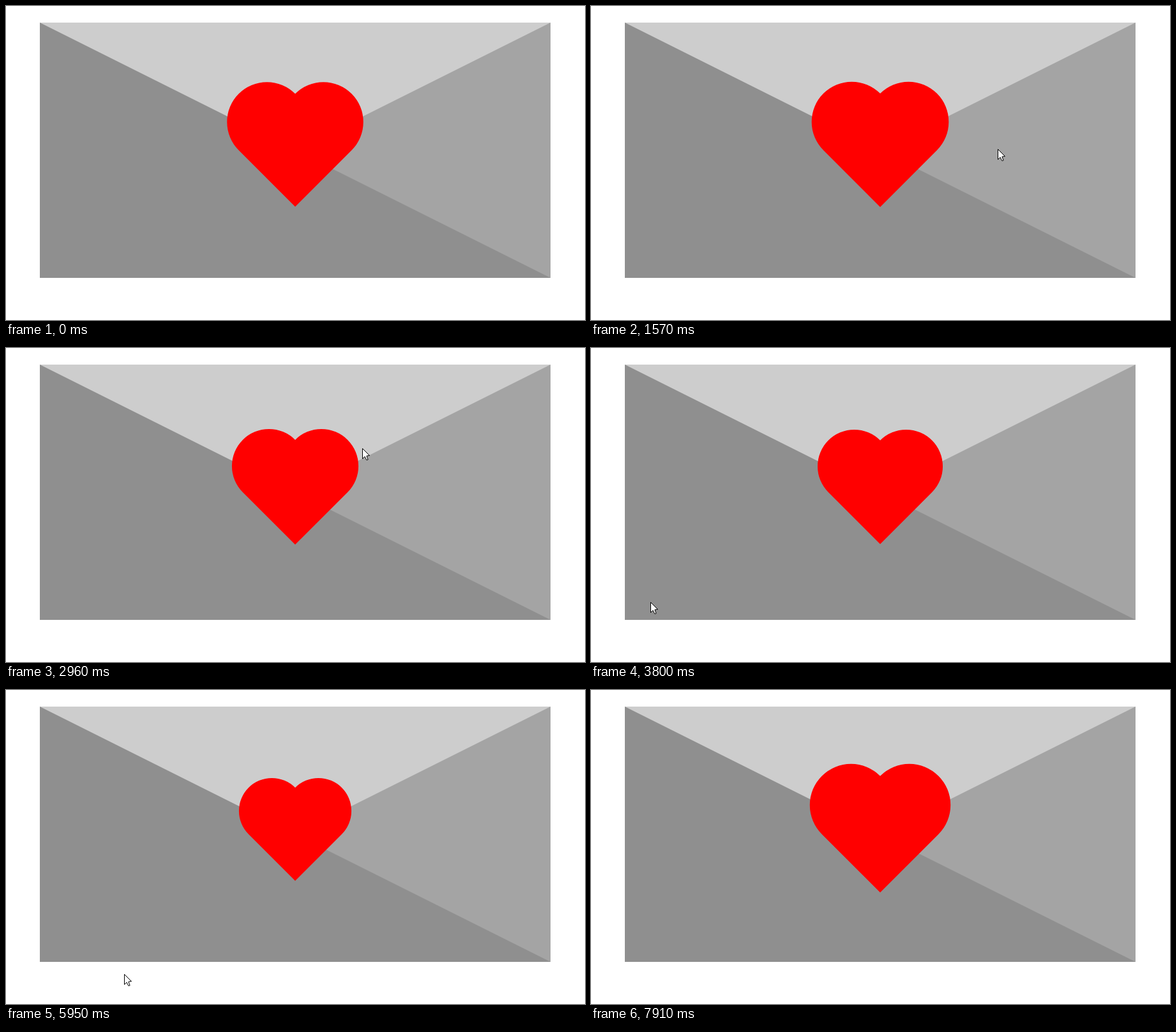
Animation of 907x492 px, one loop 7.98 s. Source, as an HTML page with a canvas:

```html
<!DOCTYPE html>
<html lang="en">
<head>
<meta charset="utf-8">
<title>Beating heart envelope</title>
<style>
  html, body { margin: 0; width: 100%; height: 100%; overflow: hidden; background: #fff; }
  canvas { display: block; }
</style>
</head>
<body>
<canvas id="stage" width="907" height="492"></canvas>
<script>
const ctx = document.getElementById('stage').getContext('2d');
const LOOP = 7980;
const CENTER = { x: 453, y: 226 };
const BEAT = { peak: 270, period: 1552, min: 70, max: 130 };

// Two strokes of the pointer: in and around the heart, then out. It rests between them.
const key = (t, x, y) => ({ t, x, y });
const STROKES = [
  [key(950, 868, 530), key(1270, 790, 300), key(1570, 638, 224), key(1980, 424, 42),
   key(2240, 285, 160), key(2450, 360, 285), key(2820, 565, 203), key(2960, 559, 157),
   key(3220, 350, 95), key(3800, 93, 398), key(4080, 70, 448)],
  [key(5670, 70, 448), key(6300, 440, 446), key(6920, 801, 484), key(7100, 890, 520)]
];

const mix = (a, b, k) => a + (b - a) * k;

const bezier = (a, b, s) =>
  3 * a * s * (1 - s) ** 2 + 3 * b * s * s * (1 - s) + s ** 3;

// Same curve as the CSS "ease" keyword.
function ease(x) {
  let low = 0, high = 1;
  for (let i = 0; i < 24; i++) {
    const mid = (low + high) / 2;
    if (bezier(0.25, 0.25, mid) < x) low = mid; else high = mid;
  }
  return bezier(0.1, 1, low);
}

// Grows and shrinks along the same curve, like an alternating CSS animation.
function heartSide(t) {
  const phase = (t - BEAT.peak + BEAT.period) / BEAT.period % 1;
  return mix(BEAT.min, BEAT.max, ease(Math.abs(1 - 2 * phase)));
}

// Smooth curve through the keys, standing still at both ends.
function along(keys, t, axis) {
  const last = keys.length - 1;
  if (t >= keys[last].t) return keys[last][axis];
  const i = keys.findIndex(k => k.t > t) - 1;
  const slope = n => n === 0 || n === last ? 0
    : (keys[n + 1][axis] - keys[n - 1][axis]) / (keys[n + 1].t - keys[n - 1].t);
  const a = keys[i], b = keys[i + 1], span = b.t - a.t, u = (t - a.t) / span;
  return mix(a[axis], b[axis], u * u * (3 - 2 * u))
    + span * u * (1 - u) * (slope(i) * (1 - u) - slope(i + 1) * u);
}

function trace(points) {
  ctx.beginPath();
  points.forEach(([x, y]) => ctx.lineTo(x, y));
  ctx.closePath();
}

function polygon(color, ...points) {
  trace(points);
  ctx.fillStyle = color;
  ctx.fill();
}

function drawEnvelope() {
  const left = 53, top = 26, right = 853, bottom = 426;
  ctx.fillStyle = '#cdcdcd';
  ctx.fillRect(left, top, right - left, bottom - top);
  polygon('#a4a4a4', [right, top], [right, bottom], [left, bottom]);
  polygon('#8f8f8f', [left, top], [right, bottom], [left, bottom]);
}

function drawHeart(side) {
  const half = side / 2;
  ctx.save();
  ctx.translate(CENTER.x, CENTER.y);
  ctx.rotate(-Math.PI / 4);
  ctx.fillStyle = '#f00';
  ctx.beginPath();
  ctx.rect(-half, -half, side, side);
  ctx.moveTo(half, -half);
  ctx.arc(0, -half, half, 0, Math.PI * 2);
  ctx.moveTo(side, 0);
  ctx.arc(half, 0, half, 0, Math.PI * 2);
  ctx.fill();
  ctx.restore();
}

function drawPointer(t) {
  const stroke = STROKES.filter(keys => keys[0].t <= t).pop();
  if (!stroke) return;
  const [x, y] = ['x', 'y'].map(axis => Math.round(along(stroke, t, axis)));
  ctx.save();
  ctx.translate(x + 0.5, y + 0.5);
  trace([[0, 0], [0, 16], [3.6, 12.6], [6.3, 18], [8.6, 17.4], [6.4, 11.6], [11, 11]]);
  ctx.fillStyle = '#fff';
  ctx.fill();
  ctx.strokeStyle = '#000';
  ctx.lineWidth = 1;
  ctx.stroke();
  ctx.restore();
}

function draw(time) {
  const t = time % LOOP;
  ctx.fillStyle = '#fff';
  ctx.fillRect(0, 0, 907, 492);
  drawEnvelope();
  drawHeart(heartSide(t));
  drawPointer(t);
}

const begin = performance.now();
function tick() {
  draw(performance.now() - begin);
  requestAnimationFrame(tick);
}
tick();
</script>
</body>
</html>
```
